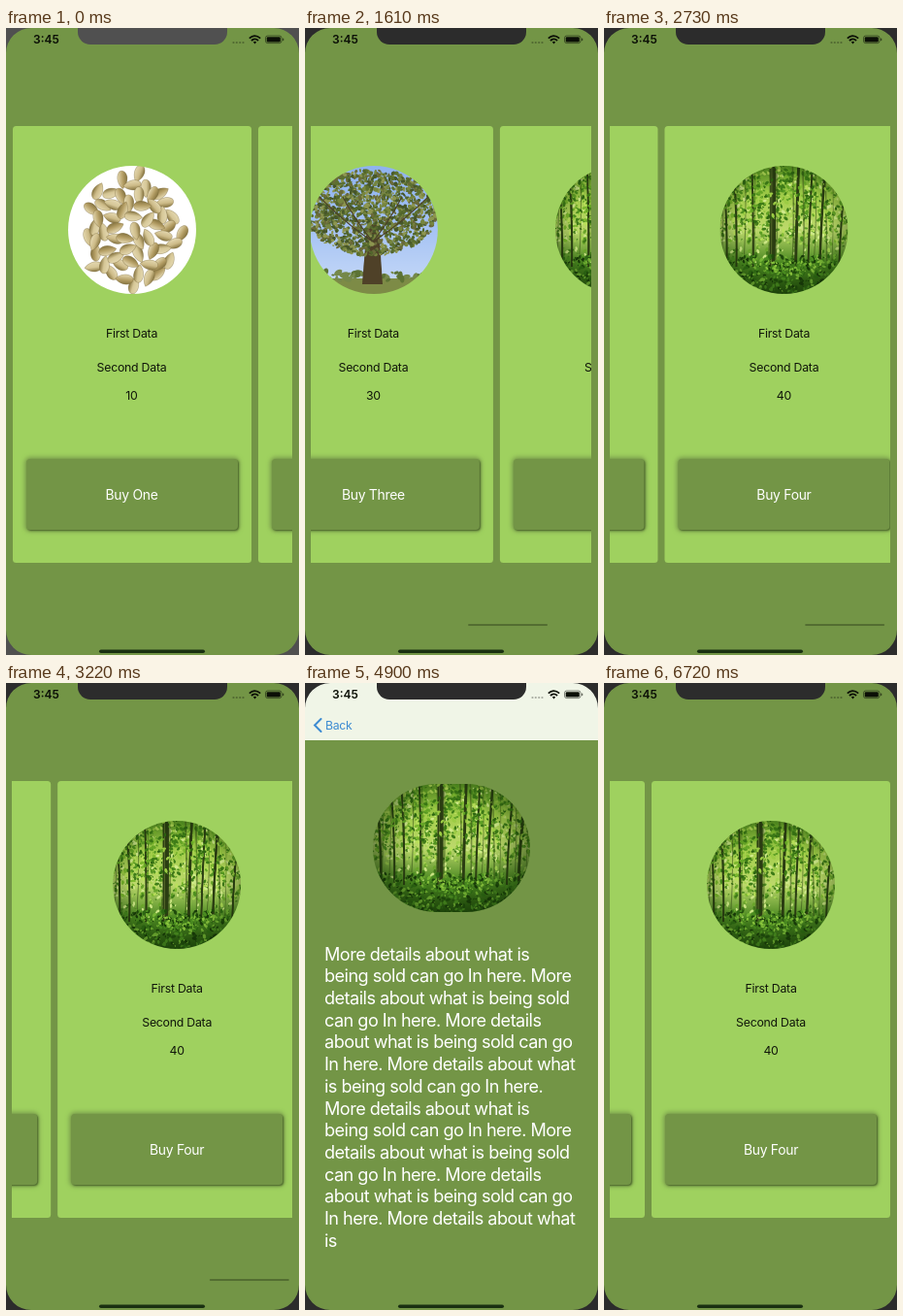
An HTML page with a canvas that plays this animation: 302x646 px, repeating every 6.79 s.

```html
<!DOCTYPE html>
<html lang="en">
<head>
<meta charset="utf-8">
<title>Card list</title>
<style>
  html, body { margin: 0; width: 100%; height: 100%; overflow: hidden; }
  body { background: #739546; font-family: Inter, Roboto, sans-serif; }
  #stage { position: relative; width: 302px; height: 646px; overflow: hidden; background: #739546; }
  #stage div, canvas, svg { position: absolute; }
  #home, #detail { left: 0; top: 0; width: 302px; height: 646px; background: #739546; }
  #list { left: 6px; top: 101px; width: 289px; height: 450px; overflow: hidden; }
  #row { left: 0; top: 0; }
  .card { top: 0; width: 246px; height: 450px; border-radius: 3.5px; background: #9fd15f; }
  .card canvas { left: 57px; top: 41px; border-radius: 50%; }
  .line { left: 0; width: 246px; height: 20px; line-height: 20px; text-align: center;
    font-size: 12.3px; letter-spacing: -.02em; color: #10160a; }
  .buy { left: 14px; top: 343px; width: 218px; height: 73px; line-height: 74px; border-radius: 4px;
    background: #739546; color: #fff; text-align: center; font-size: 13.9px; letter-spacing: -.02em;
    box-shadow: 1px 1px 2px rgba(40, 58, 20, .65), 0 0 4px 2px #7b9e4d; }
  #bar { top: 613.5px; width: 81.5px; height: 2px; border-radius: 1px; background: #536d31; }
  #detail { box-shadow: 0 0 6px rgba(0, 0, 0, .25); }
  #nav { left: 0; top: 0; width: 302px; height: 59px; background: #f0f5e7; }
  #back { left: 21px; top: 33.5px; line-height: 20px; font-size: 12.2px; letter-spacing: -.02em; color: #3c8bd2; }
  #detail canvas { left: 70px; top: 104px; border-radius: 66px; }
  #more { left: 20px; top: 267.7px; white-space: pre; font-size: 18.1px; line-height: 22.68px;
    letter-spacing: -.029em; color: #fff; }
  #clock { left: 28px; top: 2px; line-height: 20px; font-size: 12px; font-weight: 600; color: #0b0f06; }
  #frame { left: 0; top: 0; }
</style>
</head>
<body>
<div id="stage">
  <div id="home">
    <div id="list"><div id="row"></div></div>
    <div id="bar"></div>
  </div>
  <div id="detail">
    <div id="nav">
      <svg width="20" height="59"><path d="M16.5 37 L10 43.5 L16.5 50" fill="none" stroke="#3c8bd2" stroke-width="2" stroke-linecap="round"/></svg>
      <div id="back">Back</div>
    </div>
    <div id="more">More details about what is
being sold can go In here. More
details about what is being sold
can go In here. More details
about what is being sold can go
In here. More details about what
is being sold can go In here.
More details about what is
being sold can go In here. More
details about what is being sold
can go In here. More details
about what is being sold can go
In here. More details about what
is</div>
  </div>
  <div id="clock">3:45</div>
  <svg id="frame" width="302" height="646">
    <g id="shell" fill="#2c2c2c">
      <path fill-rule="evenodd" d="M0 0H302V646H0Z M26 0A26 26 0 0 0 0 26V620A26 26 0 0 0 26 646H276A26 26 0 0 0 302 620V26A26 26 0 0 0 276 0Z"/>
      <path d="M74 0V4A13 13 0 0 0 87 17H215A13 13 0 0 0 228 4V0Z"/>
    </g>
    <g fill="#000" opacity=".3">
      <circle cx="234.5" cy="15" r="1.1"/><circle cx="237.8" cy="15" r="1.1"/>
      <circle cx="241.2" cy="15" r="1.1"/><circle cx="244.5" cy="15" r="1.1"/>
    </g>
    <g fill="none" stroke="#0b0f06" stroke-width="1.8">
      <path d="M250.8 10.6Q256.5 5.6 262.2 10.6"/>
      <path d="M252.9 13Q256.5 9.8 260.1 13"/>
    </g>
    <path d="M254.8 14.4Q256.5 13 258.2 14.4L256.5 16.4Z" fill="#0b0f06"/>
    <rect x="267.5" y="8" width="16.5" height="7.6" rx="2.2" fill="none" stroke="#0b0f06" stroke-opacity=".5"/>
    <rect x="268.7" y="9.2" width="14.1" height="5.2" rx="1.2" fill="#0b0f06"/>
    <rect x="285" y="10.4" width="1.3" height="2.8" rx=".6" fill="#0b0f06" opacity=".6"/>
    <rect x="96" y="640.5" width="109" height="3.6" rx="1.8" fill="#1a3011"/>
  </svg>
</div>
<script>
const LOOP = 6790, STEP = 70, PITCH = 253.5;
const $ = id => document.getElementById(id);

function seeded(s) {
  return () => (s = (s * 16807) % 2147483647) / 2147483647;
}

function picture(width, draw) {
  const canvas = document.createElement('canvas');
  canvas.width = width * 2;
  canvas.height = 264;
  canvas.style.width = width + 'px';
  canvas.style.height = '132px';
  const c = canvas.getContext('2d');
  c.scale(2, 2);
  draw(c);
  return canvas;
}

function fill(c, colour, x = 0, y = 0, w = 170, h = 132) {
  c.fillStyle = colour;
  c.fillRect(x, y, w, h);
}

function oval(c, colour, x, y, rx, ry, turn = 0) {
  c.fillStyle = colour;
  c.beginPath();
  c.ellipse(x, y, rx, ry, turn, 0, 7);
  c.fill();
}

function stroke(c, colour, width, x0, y0, cx, cy, x1, y1) {
  c.strokeStyle = colour;
  c.lineWidth = width;
  c.beginPath();
  c.moveTo(x0, y0);
  c.quadraticCurveTo(cx, cy, x1, y1);
  c.stroke();
}

function fade(c, y0, y1, ...colours) {
  const g = c.createLinearGradient(0, y0, 0, y1);
  colours.forEach((col, i) => g.addColorStop(i / (colours.length - 1), col));
  return g;
}

// Scatter of small leaf-like specks inside a box
function specks(c, rnd, n, x, y, w, h, size, colours) {
  for (let i = 0; i < n; i++) {
    const r = size * (.4 + rnd());
    oval(c, colours[Math.floor(rnd() * colours.length)],
      x + rnd() * w, y + rnd() * h, r, r * .6, rnd() * 3);
  }
}

function seeds(c) {
  const rnd = seeded(41);
  fill(c, '#fff');
  for (let i = 58; i >= 0; i--) {
    const a = i * 2.39996, r = 7 * Math.sqrt(i) + rnd() * 7;
    c.save();
    c.translate(66 + Math.cos(a) * r * .88, 67 + Math.sin(a) * r);
    c.rotate(rnd() * 6.3);
    const g = c.createLinearGradient(0, -5, 0, 5);
    g.addColorStop(0, '#e4d8b0');
    g.addColorStop(.55, ['#cdbb88', '#b59f66', '#d6c797'][i % 3]);
    g.addColorStop(1, '#85733f');
    c.fillStyle = g;
    c.beginPath();
    c.moveTo(-9.5, 0);
    c.bezierCurveTo(-5, -5, 3, -7, 8, -3);
    c.bezierCurveTo(10.5, 0, 8, 4.5, 2, 5);
    c.bezierCurveTo(-3, 5, -6, 3, -9.5, 0);
    c.fill();
    c.strokeStyle = 'rgba(120,102,56,.45)';
    c.lineWidth = .7;
    c.stroke();
    c.restore();
  }
}

function leaf(c, x0, y0, x1, y1, width) {
  const len = Math.hypot(x1 - x0, y1 - y0);
  const shape = (k, colour) => {
    const w = width * k * .68;
    c.fillStyle = colour;
    c.beginPath();
    c.moveTo(0, 0);
    c.bezierCurveTo(len * .12, -w, len * .7, -w, len * (.4 + .6 * k), 0);
    c.bezierCurveTo(len * .7, w, len * .12, w, 0, 0);
    c.fill();
  };
  c.save();
  c.translate(x0, y0);
  c.rotate(Math.atan2(y1 - y0, x1 - x0));
  shape(1, '#5c8f2c');
  shape(.88, '#a5c052');
  shape(.6, '#c3d67c');
  for (let i = 1; i < 12; i++) {
    const x = len * i / 13, w = width * .45 * Math.sin(Math.PI * (i + 1) / 14);
    for (const side of [-1, 1])
      stroke(c, '#6b9a38', 1.5, x, 0, x + 4, side * w * .5, x + 8, side * w);
  }
  stroke(c, '#dfe9aa', 1.3, 0, 0, len / 2, 0, len, 0);
  c.restore();
}

function plant(c) {
  fill(c, fade(c, 0, 132, '#b4b5a4', '#cfcdc2', '#948a84'));
  fill(c, '#7c8070', 22, 0, 5, 80);
  fill(c, '#dddcd8', 92, 0, 40, 45);
  fill(c, '#77747c', 106, 45, 26, 50);
  fill(c, '#4c474c', 98, 62, 20, 30);
  fill(c, '#a59d9f', 104, 96, 28, 36);
  c.fillStyle = fade(c, 85, 132, '#a03a20', '#cf5630');
  c.beginPath();
  c.moveTo(5, 80);
  c.lineTo(118, 82);
  c.lineTo(100, 132);
  c.lineTo(20, 132);
  c.fill();
  oval(c, '#d08468', 61, 86, 58, 19);
  oval(c, '#451410', 61, 87, 55, 17);
  oval(c, '#642016', 44, 92, 28, 8);
  stroke(c, '#6f9c38', 3, 52, 8, 38, 40, 48, 92);
  stroke(c, '#88ad4d', 2.5, 28, 40, 48, 32, 54, 92);
  stroke(c, '#6f9c38', 2.5, 72, 56, 56, 50, 58, 92);
  leaf(c, 62, 0, 32, 18, 20);
  leaf(c, 32, 38, -3, 82, 30);
  leaf(c, 50, 6, 107, 72, 48);
  leaf(c, 73, 54, 68, 133, 54);
}

function tree(c) {
  const rnd = seeded(77);
  fill(c, fade(c, 0, 120, '#8fb3ef', '#a3c1f4', '#c3d7f7'));
  fill(c, '#7d8b46', 0, 116, 170, 16);
  specks(c, rnd, 50, 0, 110, 132, 8, 4, ['#5c7334', '#75884a']);
  c.fillStyle = '#4f4128';
  c.beginPath();
  c.moveTo(59, 60);
  c.lineTo(71, 60);
  c.lineTo(75, 122);
  c.lineTo(54, 122);
  c.fill();
  const tones = ['#52662c', '#5d7030', '#76853f', '#8d9550', '#46562a', '#6a6a3a'];
  for (let i = 0; i < 1400; i++) {
    const a = rnd() * 6.3, r = Math.sqrt(rnd());
    oval(c, tones[i % 6], 64 + Math.cos(a) * r * 68, 48 + Math.sin(a) * r * 44,
      .8 + rnd() * 2.2, .8 + rnd() * 1.5, rnd() * 3);
  }
  for (const x of [10, 34, 95, 122]) stroke(c, '#4a4028', 1.2, 65, 78, (65 + x) / 2, 60, x, 32);
}

function forest(c) {
  const rnd = seeded(19);
  fill(c, fade(c, 0, 132, '#5f9a25', '#a5cf4c', '#bdd96c', '#4d8a22', '#234f0d'));
  specks(c, rnd, 900, 0, -4, 162, 82, 2, ['#3f7d18', '#4f9120', '#7cb82e', '#b9e05a', '#d0ea8a', '#5d9f25']);
  specks(c, rnd, 260, 0, 50, 162, 50, 1.8, ['#6aa52b', '#a8d553', '#cbe584', '#417a1a']);
  for (let i = 0; i < 14; i++) {
    const x = 4 + i * 11.5 + rnd() * 6;
    stroke(c, 'rgba(48,72,18,.5)', .7 + rnd(), x, 0, x + 2, 50, x + rnd() * 4 - 2, 98);
  }
  const trunks = [[9, 2.5], [23, 2], [33, 2], [50, 2], [70, 6], [94, 3], [107, 2], [119, 2.5], [139, 2], [151, 3]];
  for (const [x, w] of trunks) stroke(c, '#2b3d12', w, x + (x - 72) * .1, -2, x, 60, x - 1, 104);
  stroke(c, '#55682a', 1, 68.5, 0, 68.5, 60, 68, 104);
  specks(c, rnd, 380, 0, -4, 162, 62, 1.9, ['#3c7a16', '#65a526', '#9ccc44', '#2f6612']);
  specks(c, rnd, 650, -4, 92, 170, 42, 2, ['#1f4a0c', '#2f6a14', '#4a8c20', '#76b535', '#183a09']);
  specks(c, rnd, 90, 45, 98, 75, 14, 1.5, ['#8cc63f', '#6cab2e', '#3d781a']);
  const g = c.createRadialGradient(81, 62, 45, 81, 66, 95);
  g.addColorStop(0, 'rgba(14,40,4,0)');
  g.addColorStop(1, 'rgba(14,40,4,.65)');
  fill(c, g);
}

function add(parent, cls, text) {
  const el = document.createElement('div');
  el.className = cls;
  if (text) el.textContent = text;
  parent.append(el);
  return el;
}

const croppedForest = c => { c.translate(-15, 0); forest(c); };
[['One', seeds], ['Two', plant], ['Three', tree], ['Four', croppedForest]].forEach(([name, draw], i) => {
  const card = add($('row'), 'card');
  card.style.left = .5 + i * PITCH + 'px';
  card.append(picture(132, draw));
  const lines = [['First Data', 203.5], ['Second Data', 238.5], [String((i + 1) * 10), 267.5]];
  for (const [text, top] of lines) add(card, 'line', text).style.top = top + 'px';
  add(card, 'buy', 'Buy ' + name);
});
$('detail').append(picture(162, forest));

// The finger drags the row, then lets it glide out to its end
const GRAB = 770, RELEASE = 970, END = 718, DECAY = 475;
const glide = t => Math.min(END, 719 - 429 * Math.exp((1120 - t) / DECAY));

function scrollAt(t) {
  return t < RELEASE ? glide(RELEASE) * ramp(t, GRAB, RELEASE) ** 2 : glide(t);
}

const ramp = (t, from, to) => Math.min(1, Math.max(0, (t - from) / (to - from)));
const easeOut = u => 1 - (1 - u) ** 3;

function render(time) {
  const t = Math.floor(time % LOOP / STEP) * STEP;
  const s = scrollAt(t);
  const open = easeOut(ramp(t, 4340, 4830)) - easeOut(ramp(t, 6230, 6660));
  $('row').style.transform = `translateX(${-s}px)`;
  $('bar').style.transform = `translateX(${8 + s * .2827}px)`;
  $('bar').style.opacity = ramp(t, GRAB, GRAB + STEP) - ramp(t, 4200, 4480);
  $('home').style.transform = `translateX(${-90 * open}px)`;
  $('detail').style.transform = `translateX(${302 * (1 - open)}px)`;
  $('detail').style.visibility = open > 0 ? 'visible' : 'hidden';
  const grey = Math.round(80 - 36 * ramp(t, 0, 210));
  $('shell').setAttribute('fill', `rgb(${grey},${grey},${grey})`);
}

const start = performance.now();
function tick() {
  render(performance.now() - start);
  requestAnimationFrame(tick);
}
tick();
</script>
</body>
</html>
```
